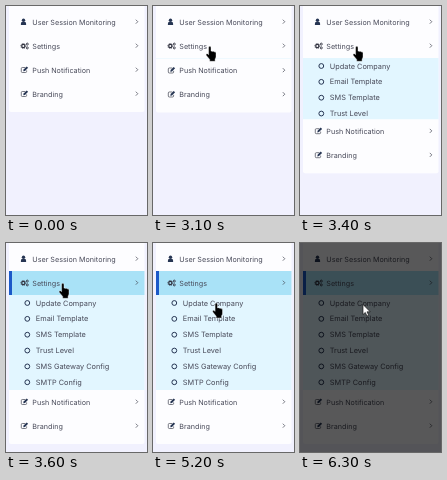
Animation of 141x209 px, one loop 7000 ms. Source, as an HTML page:

```html
<!DOCTYPE html>
<html lang="en">
<head>
<meta charset="utf-8">
<title>Settings menu</title>
<style>
  html, body { margin: 0; width: 100%; height: 100%; overflow: hidden; background: #f1f1fe; }
  svg { display: block; width: 100vw; height: 100vh; }
  text { font: 400 7.2px Inter, sans-serif; fill: #484a59; text-rendering: geometricPrecision; }
  #submenu text { font-size: 7.35px; }
  .line { fill: none; stroke: #40424f; stroke-width: .7; }
  .solid { fill: #263553; }
</style>
</head>
<body>
<svg viewBox="0 0 141 209">
  <defs>
    <clipPath id="fold"><rect id="foldArea" x="3" y="52" width="136" height="0"/></clipPath>
    <g id="user" class="solid">
      <circle cx="17.5" cy="14.2" r="1.7"/>
      <path d="M14.9 19v-1.2q0-1.9 1.5-2.1 1.1.7 2.2 0 1.5.2 1.5 2.1V19z"/>
    </g>
    <g id="cogs" fill="none" stroke="#30323f">
      <circle cx="17.3" cy="40" r="1.6" stroke-width="1.2"/>
      <circle cx="17.3" cy="40" r="2.5" stroke-width=".8" stroke-dasharray="1 .963"/>
      <circle cx="21.3" cy="38.1" r="1" stroke-width=".9"/>
      <circle cx="21.3" cy="41.9" r="1" stroke-width=".9"/>
    </g>
    <g id="edit">
      <path class="line" d="M19.3-2.5h-3q-1 0-1 1v3q0 1 1 1h3.3q1 0 1-1V.4"/>
      <path class="solid" d="M17.3 1.2l.3-1.7 3.1-3.1 1.4 1.4L19 .9z"/>
    </g>
  </defs>

  <rect width="141" height="209" fill="#f1f1fe"/>
  <rect id="card" x="3" y="-5" width="135.5" rx="2" fill="#fdfdff"/>
  <g id="active">
    <rect x="3" y="28" width="135.5" height="24" fill="#a9e2f7"/>
    <rect x="3" y="28" width="3" height="24" fill="#1b59c8"/>
  </g>
  <g id="submenu" clip-path="url(#fold)">
    <rect x="3" y="52" width="135.5" height="95.5" fill="#e2f6ff"/>
  </g>
  <g id="top"><use href="#user"/><use href="#cogs"/></g>
  <g id="bottom">
    <use href="#edit" y="64"/><use href="#edit" y="88"/>
  </g>
  <rect id="shade" width="141" height="209"/>
  <path id="hand" stroke="#fff" stroke-width=".4" d="M2.6 1.4q0-1.4 1.2-1.4T5 1.4v3.5q1-.6 1.7.3 1-.5 1.7.4 1.6-.3 1.6 1.4v3.2q0 1.5-.9 2.5V15H3.7v-1.8L.3 9.1Q-.4 7.8.8 7.4q.9-.2 1.8 1z"/>
  <path id="arrow" fill="#fff" stroke="#000" stroke-width=".6" d="M63 61.5v10l2.3-2.1 1.7 3.7 1.7-.8-1.7-3.5h3.2z"/>
</svg>
<script>
const LOOP = 7000, STEP = 100, FOLD_HEIGHT = 95.5;
const el = id => document.getElementById(id);

function add(parent, tag, attrs, content = '') {
  const node = document.createElementNS('http://www.w3.org/2000/svg', tag);
  set(node, attrs);
  node.textContent = content;
  el(parent).appendChild(node);
}

function set(node, attrs) {
  for (const name in attrs) node.setAttribute(name, attrs[name]);
}

function addRow(parent, label, y) {
  add(parent, 'text', { x: 26.3, y: y + 2.5 }, label);
  add(parent, 'path', { class: 'line', d: `M129.8 ${y - 2.3}l2 2-2 2` });
}

addRow('top', 'User Session Monitoring', 16);
addRow('top', 'Settings', 40);
addRow('bottom', 'Push Notification', 64);
addRow('bottom', 'Branding', 88);

['Update Company', 'Email Template', 'SMS Template', 'Trust Level', 'SMS Gateway Config', 'SMTP Config']
  .forEach((label, i) => {
    const y = 60 + i * 15.85;
    add('submenu', 'circle', { cx: 21.3, cy: y, r: 2.4, fill: 'none', stroke: '#263553', 'stroke-width': 1 });
    add('submenu', 'text', { x: 29.8, y: y + 2.6 }, label);
  });

const swing = (t, start, end) => {
  const p = Math.min(1, Math.max(0, (t - start) / (end - start)));
  return (1 - Math.cos(Math.PI * p)) / 2;
};
const show = (id, visible) => set(el(id), { visibility: visible ? 'visible' : 'hidden' });

function draw(t) {
  const open = FOLD_HEIGHT * swing(Math.min(t, 3600), 3075, 3625);
  set(el('foldArea'), { height: open });
  set(el('card'), { height: 111 + open });
  set(el('bottom'), { transform: `translate(0 ${open})` });
  show('active', t >= 3600);

  const toSettings = swing(t, 2200, 2400);
  const toCompany = swing(t, 4500, 5200);
  const x = 55 - 2 * toSettings + 6.5 * toCompany;
  const y = 18.3 + 22 * toSettings + 19.7 * toCompany;
  set(el('hand'), { transform: `translate(${x} ${y})` });
  show('hand', t >= 2200 && t < 6200);
  show('arrow', t >= 6200);
  set(el('shade'), { opacity: t < 6200 ? 0 : t < 6300 ? .33 : .65 });
}

const begin = performance.now();
function tick() {
  const t = (performance.now() - begin) % LOOP;
  draw(Math.floor(t / STEP) * STEP);
  requestAnimationFrame(tick);
}
tick();
</script>
</body>
</html>
```
